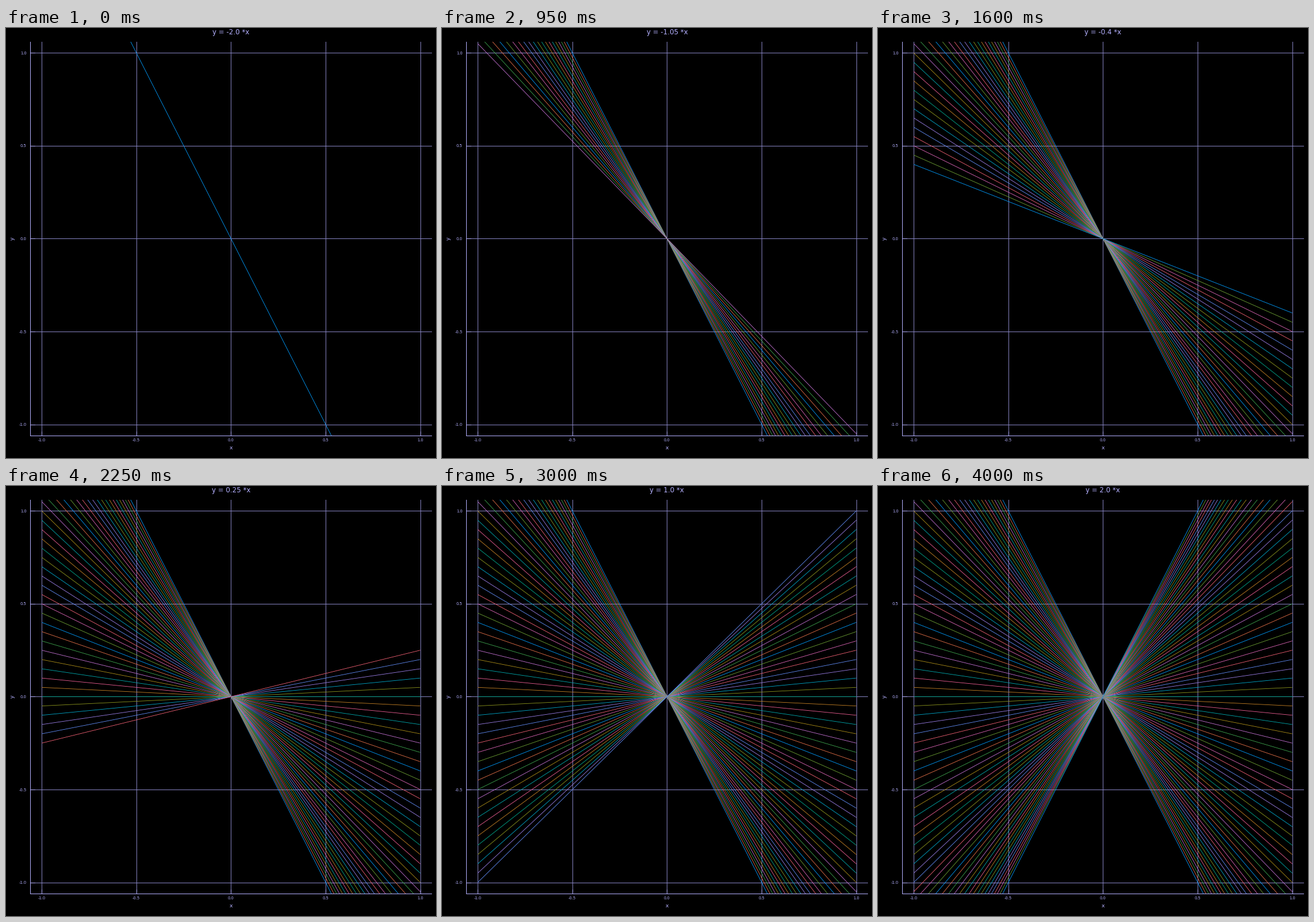
These frames come from a looping animation (748x748 px, 4.05 s). A matplotlib script:

```python
import matplotlib.pyplot as plt
from matplotlib.animation import FuncAnimation
from matplotlib.collections import LineCollection

SIZE = 748
DPI = 100
PX = 72 / DPI  # one pixel in points
FRAMES = 81
LIM = 1.06
LEFT, RIGHT, TOP, BOTTOM = 42.4, 740.4, 23.9, 709.0

INK = "#b4b0ff"
GRID = "#8683c2"
PALETTE = [
    "#009afa", "#e36f47", "#3ea44e", "#c371d2",
    "#ac8e18", "#00aaae", "#ed5e93", "#c68225",
    "#00a98d", "#8e971e", "#00a9cc", "#9b7fe8",
    "#618cf6", "#f06073", "#dd65b6", "#6c9f33",
]

plt.rcParams["font.family"] = "DejaVu Sans"
fig = plt.figure(figsize=(SIZE / DPI, SIZE / DPI), dpi=DPI, facecolor="black")
ax = fig.add_axes([LEFT / SIZE, 1 - BOTTOM / SIZE,
                   (RIGHT - LEFT) / SIZE, (BOTTOM - TOP) / SIZE])
ax.set_xlim(-LIM, LIM)
ax.set_ylim(-LIM, LIM)
ax.axis("off")


def to_px(x, y):
    """Stage position of a data point, measured from the top left."""
    return (LEFT + (x + LIM) / (2 * LIM) * (RIGHT - LEFT),
            BOTTOM - (y + LIM) / (2 * LIM) * (BOTTOM - TOP))


def rule(x0, y0, x1, y1, color, z):
    fig.add_artist(plt.Line2D([x0 / SIZE, x1 / SIZE],
                              [1 - y0 / SIZE, 1 - y1 / SIZE],
                              color=color, lw=PX, zorder=z))


def label(x, y, text, size, **kw):
    return fig.text(x / SIZE, 1 - y / SIZE, text, color=INK,
                    fontsize=size * PX, **kw)


for v in (-1.0, -0.5, 0.0, 0.5, 1.0):
    x, y = to_px(v, v)
    rule(x, TOP, x, BOTTOM, GRID, -2)
    rule(LEFT, y, RIGHT, y, GRID, -2)
    rule(x, BOTTOM, x, BOTTOM - 7.5, INK, -1)
    rule(LEFT, y, LEFT + 7.5, y, INK, -1)
    label(x, 719, f"{v}", 6.8, ha="center", va="baseline")
    label(35.8, y + 2.6, f"{v}", 6.8, ha="right", va="baseline")

rule(LEFT, TOP, LEFT, BOTTOM, INK, -1)
rule(LEFT, BOTTOM, RIGHT, BOTTOM, INK, -1)

label(391.4, 733, "x", 9.4, ha="center", va="baseline")
label(11.5, 366.4, "y", 9.4, ha="center", va="center", rotation=90)
title = label(391.4, 11, "", 11.9, ha="center", va="baseline")

slopes = [(k - 40) / 20 for k in range(FRAMES)]
segments = [[(-1, -m), (1, m)] for m in slopes]
fan = LineCollection([], colors=[PALETTE[k % 16] for k in range(FRAMES)],
                     linewidths=0.85 * PX)
ax.add_collection(fan, autolim=False)


def update(k):
    fan.set_segments(segments[:k + 1])
    title.set_text(f"y = {slopes[k]} *x")
    return fan, title


anim = FuncAnimation(fig, update, frames=FRAMES, interval=50,
                     repeat=True, repeat_delay=0)
plt.show()
```
